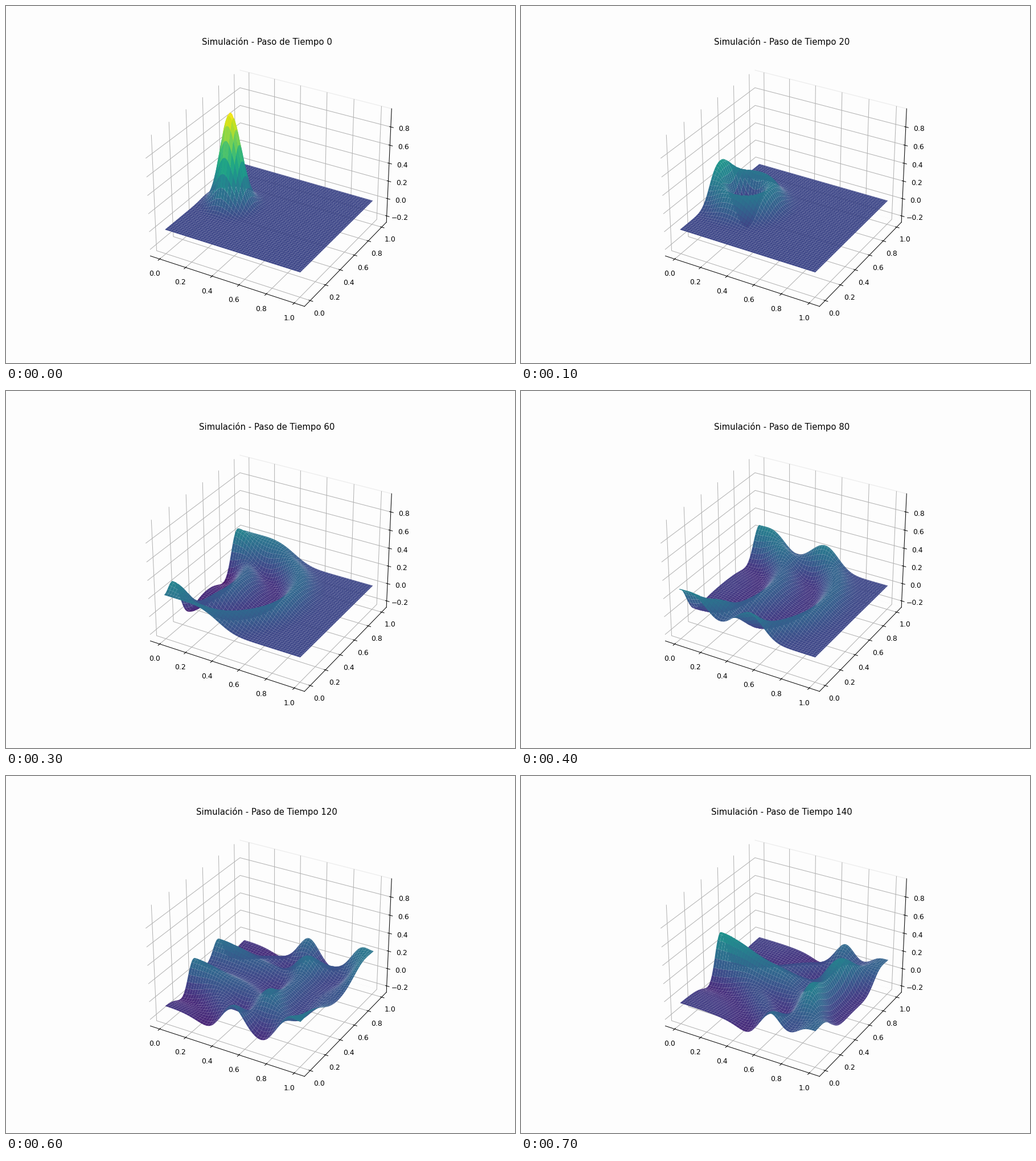
Animation of 894 by 626 pixels, one loop 0.8 s. Source, as a matplotlib script:

```python
import matplotlib.pyplot as plt
import numpy as np
from matplotlib.animation import FuncAnimation

WIDTH, HEIGHT, DPI = 894, 626, 89.4
FRAMES, INTERVAL = 8, 100
STEPS_PER_FRAME = 20
N = 100
ADVANCE = 0.007            # distance the wave travels in one time step
MARGIN = 0.05 + 1.1 / 48
BACKGROUND = "#fdfdfd"

grid = np.linspace(0, 1, N)
X, Y = np.meshgrid(grid, grid, indexing="ij")


def laplacian(u):
    """Five-point stencil with reflecting walls."""
    p = np.pad(u, 1, mode="reflect")
    return p[2:, 1:-1] + p[:-2, 1:-1] + p[1:-1, 2:] + p[1:-1, :-2] - 4 * u


def simulate():
    """Solve the wave equation and keep the state of every shown step."""
    courant2 = (ADVANCE * (N - 1)) ** 2
    previous = np.exp(-100 * ((X - 0.2) ** 2 + (Y - 0.5) ** 2))
    current = previous.copy()
    shown = [previous]
    last = (FRAMES - 1) * STEPS_PER_FRAME
    for step in range(2, last + 1):
        following = 2 * current - previous + courant2 * laplacian(current)
        previous, current = current, following
        if step % STEPS_PER_FRAME == 0:
            shown.append(current)
    return np.array(shown)


states = simulate()
low, high = states.min(), states.max()

fig = plt.figure(figsize=(WIDTH / DPI, HEIGHT / DPI), dpi=DPI,
                 facecolor=BACKGROUND)
ax = fig.add_subplot(projection="3d", facecolor=BACKGROUND)
ax.set_xlim(-MARGIN, 1 + MARGIN)
ax.set_ylim(-MARGIN, 1 + MARGIN)
ax.set_zlim(low, high)
for axis in (ax.xaxis, ax.yaxis, ax.zaxis):
    axis.set_pane_color(BACKGROUND)
ax.yaxis.pane.set_edgecolor("#ececec")


def draw(index):
    for surface in list(ax.collections):
        surface.remove()
    ax.plot_surface(X, Y, states[index], cmap="viridis", vmin=low, vmax=high)
    ax.set_title(f"Simulación - Paso de Tiempo {index * STEPS_PER_FRAME}")
    return ()


animation = FuncAnimation(fig, draw, frames=FRAMES, interval=INTERVAL,
                          repeat=True, repeat_delay=0)
plt.show()
```
